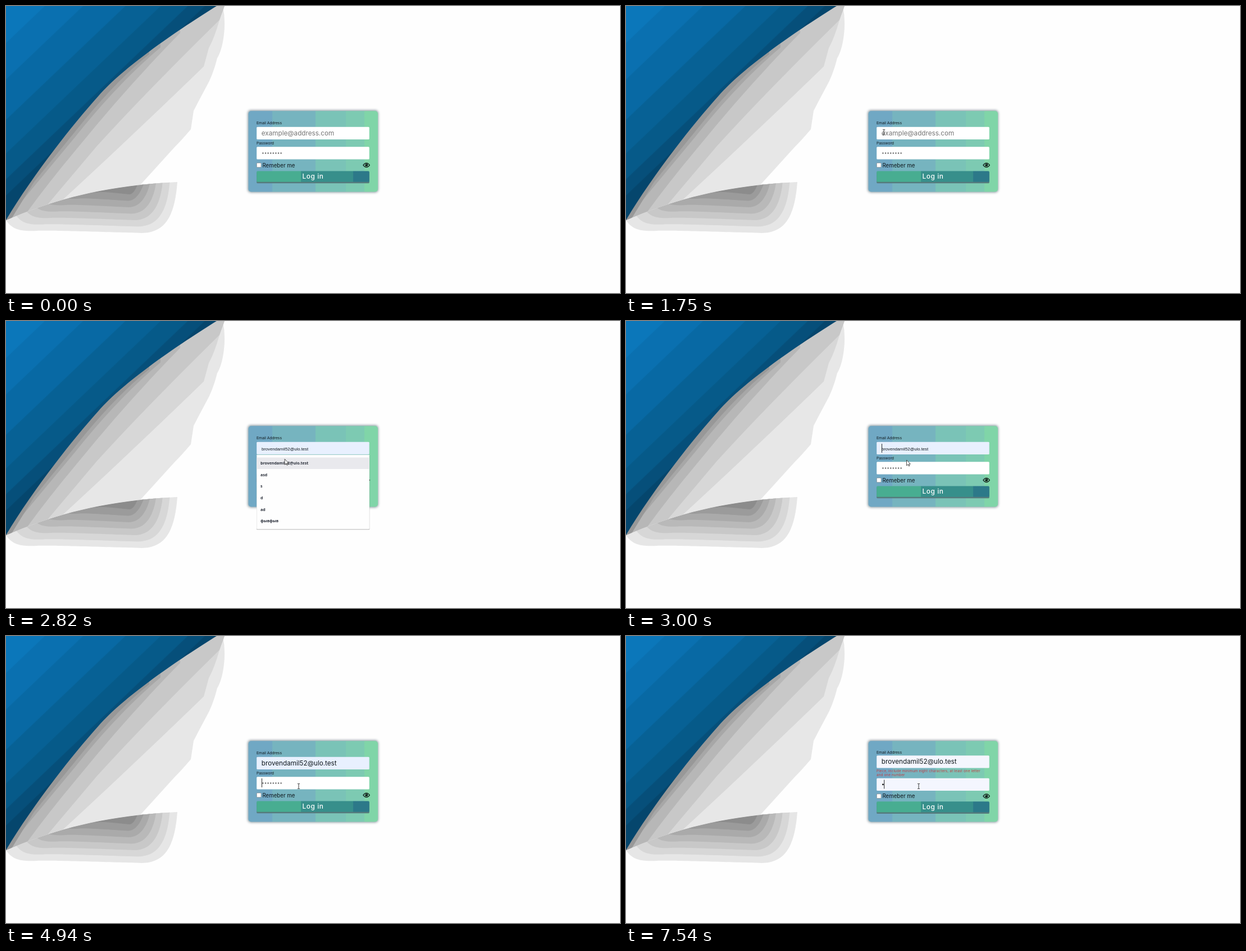
Write an HTML page that moves like this. It is 1093 px wide and 512 px high and loops after 8 s.

```html
<!DOCTYPE html>
<html lang="en">
<head>
<meta charset="utf-8">
<title>Login form</title>
<style>
  html, body { margin: 0; width: 100%; height: 100%; overflow: hidden; background: #fefefe; }
  svg { display: block; width: 100%; height: 100%; }
  text { font-family: Inter, sans-serif; fill: #10181c; white-space: pre; }
  .label { font-size: 6.7px; }
  .value { font-size: 11.7px; }
  .hint { fill: #757575; }
  .preview { font: 7.7px "Liberation Sans", Arial, sans-serif; }
  .option { font: 600 7px "Noto Sans", sans-serif; fill: #2b303b; }
  .error { font-size: 6.2px; letter-spacing: .2px; fill: #c23c40; }
  .button { font-size: 11.8px; font-weight: 500; letter-spacing: .6px; fill: #fff; }
  .caret { stroke: #111; stroke-width: .9; }
</style>
</head>
<body>
<svg viewBox="0 0 1093 512" preserveAspectRatio="none">
  <defs>
    <clipPath id="above"><path d="M0 382C90 343 180 320 305 314H400V0H0Z"/></clipPath>
    <clipPath id="below"><path d="M0 382C90 343 180 320 305 314V420H0Z"/></clipPath>
    <linearGradient id="blue" gradientUnits="userSpaceOnUse" x1="0" y1="0" x2="199.800" y2="209.200"></linearGradient>
    <linearGradient id="panel" gradientUnits="userSpaceOnUse" x1="431" y1="0" x2="662" y2="0"></linearGradient>
    <linearGradient id="action" gradientUnits="userSpaceOnUse" x1="446" y1="0" x2="647" y2="0"></linearGradient>
    <filter id="glow" x="-10%" y="-10%" width="120%" height="120%"><feGaussianBlur stdDeviation="1.9"/></filter>
  </defs>

  <g id="shadow" clip-path="url(#below)"></g>
  <g id="curl" clip-path="url(#above)"></g>
  <path fill="url(#blue)" d="M0 0H375C327 30 214 103 165 160C114 217 45 306 0 382Z"/>

  <rect x="430.500" y="186" width="232" height="146.500" rx="5" fill="#48606a" opacity=".65" filter="url(#glow)"/>
  <rect x="431.500" y="187.300" width="230.500" height="144.200" rx="5" fill="url(#panel)"/>

  <text id="emailLabel" class="label" x="446" y="211.200">Email Address</text>
  <g id="emailField">
    <rect id="emailBox" x="446.200" y="215.800" width="200.500" height="22.200" rx="1.500"/>
    <text id="emailHint" class="value hint" x="454.800" y="230.700">example@address.com</text>
    <text id="emailPreview" class="preview" x="455" y="230.600"></text>
    <text id="emailValue" class="value" x="454.800" y="230.700"></text>
    <path id="emailCaret" class="caret" d="M455.500 219V235"/>
  </g>

  <text id="passLabel" class="label" x="446" y="246.600">Password</text>
  <g id="error">
    <text class="error" x="446" y="243.400">Plece, include minimum eight characters, at least one letter</text>
    <text class="error" x="446" y="249.700">and one number</text>
  </g>
  <g id="passField">
    <rect id="passBox" x="446.200" y="251.200" width="200.500" height="22.200" rx="1.500"/>
    <g id="passHint" fill="#6c6c6c"></g>
    <circle id="passDot" cx="457.400" cy="262.400" r="1.400" fill="#111"/>
    <path id="passCaret" class="caret" d="M0 254V270"/>
  </g>

  <g id="options">
    <rect x="446.300" y="280" width="7.800" height="7.800" rx="1.200" fill="#fff" stroke="#777" stroke-width=".6"/>
    <text x="456.500" y="287.600" font-size="9.700">Remeber me</text>
    <path d="M635.800 283.800Q641.600 276.200 647.400 283.800Q641.600 291.400 635.800 283.800Z" fill="none" stroke="#0c1413" stroke-width="1.100"/>
    <circle cx="641.600" cy="283.600" r="2.500" fill="#0c1413"/>
    <circle cx="640.800" cy="282.800" r=".8" fill="#7bc9af"/>
  </g>
  <g id="submit">
    <rect x="446.200" y="296" width="200.500" height="20.200" rx="1.500" fill="#557a7c"/>
    <rect x="446.200" y="294.500" width="200.500" height="19.300" rx="1.500" fill="url(#action)"/>
    <text class="button" x="527.500" y="308.300">Log in</text>
  </g>

  <g id="dropdown">
    <rect x="446" y="239" width="201.200" height="133.200" rx="1" fill="#555" opacity=".55"/>
    <rect x="446.200" y="238.300" width="200.700" height="133.200" rx="1" fill="#fefefe"/>
    <path d="M446 238.300H647" stroke="#74b8b3" stroke-width=".7"/>
    <rect id="hover" x="446.500" y="243.500" width="200" height="20.500" fill="#e9e9ed"/>
  </g>

  <path id="arrow" d="M0 0V10L2.400 7.800L4 11L5.400 10.300L3.900 7.200H6.800Z" fill="#fff" stroke="#222" stroke-width=".8"/>
  <path id="beam" d="M-2 -4.500H-.6L0 -4L.6 -4.500H2M0 -4V4M-2 4.500H-.6L0 4L.6 4.500H2" fill="none" stroke="#222" stroke-width=".9"/>
</svg>
<script>
const EMAIL = 'brovendamil52@ulo.test';
const LOOP = 8000;
const el = id => document.getElementById(id);
const add = (parent, tag, attrs, text = '') => {
  const node = document.createElementNS('http://www.w3.org/2000/svg', tag);
  for (const name in attrs) node.setAttribute(name, attrs[name]);
  node.textContent = text;
  el(parent).append(node);
};
const show = (id, on) => { el(id).style.display = on ? '' : 'none'; };
const move = (id, x, y) => el(id).setAttribute('transform', `translate(${x} ${y})`);
const gray = level => `rgb(${level},${level},${level})`;

// Flat colour bands: each entry is a colour and the position where it ends.
function bands(id, start, end, list) {
  let from = 0;
  for (const [color, stop] of list) {
    const to = (stop - start) / (end - start);
    add(id, 'stop', { offset: from + .003, 'stop-color': color });
    add(id, 'stop', { offset: to - .003, 'stop-color': color });
    from = to;
  }
}
bands('blue', 0, 400, [['#0b77ba', 66], ['#0a70b0', 131], ['#0869a4', 203],
  ['#076195', 263], ['#065a89', 309], ['#064f7a', 338], ['#05466d', 400]]);
bands('panel', 431, 662, [['#70a8c4', 474], ['#76b4bf', 551], ['#7ac3b7', 605],
  ['#7dcab2', 638], ['#80d5a8', 662]]);
bands('action', 446, 647, [['#48ad91', 525], ['#378f8b', 618], ['#2c7989', 647]]);

[[0, 382], [19, 375], [37, 367], [55, 360], [75, 353], [105, 342], [150, 331]].forEach(([x, y], i) => {
  const right = 305 - 14 * i + .47 * i * i, bottom = 405 - 11.5 * i;
  const at = share => x + share * (right - x);
  add('shadow', 'path', {
    fill: gray(230 - 15 * i),
    d: `M${x} ${y}C${at(.04)} ${bottom - 4} ${at(.1)} ${bottom - 3} ${at(.18)} ${bottom - 4}
      S${at(.65)} ${bottom - 1} ${at(.79)} ${bottom}C${at(.93)} ${bottom} ${at(.985)} ${bottom - 30} ${right} 314V290H${x}Z`
  });
});

[
  [231, 'H386Q391 25 388 50Q385 78 376 93Q368 125 355 147Q340 175 334 187L329 220Q312 240 299 253L241 317L230 335'],
  [215, 'H389L380 25Q371 57 361 75L352 108Q220 236 105 342L90 355'],
  [200, 'H389L380 25Q245 158 160 252L75 353L65 365'],
  [183, 'H310V48Q215 145 130 250Q78 312 38 367L30 380'],
  [167, 'H275V74Q200 137 122 235L25 352'],
  [152, 'H255V86Q200 130 140 203L50 314']
].forEach(([level, edge]) =>
  add('curl', 'path', { fill: gray(level), d: `M0 0${edge}L0 395Z` }));

for (let i = 0; i < 8; i++)
  add('passHint', 'circle', { cx: 457.4 + 4.6 * i, cy: 262.5, r: 1.25 });
[EMAIL, 'asd', 's', 'd', 'ad', 'фывфыв'].forEach((text, i) =>
  add('dropdown', 'text', { class: 'option', x: 453, y: 256 + 20.65 * i }, text));
el('emailPreview').textContent = el('emailValue').textContent = EMAIL;

// Pointer path: time, x, y
const PATH = [[960, 150, 2], [1000, 236, 72], [1150, 302, 121], [1300, 364, 174], [1500, 428, 208],
  [1690, 455, 219], [1750, 459, 225], [1890, 477, 225], [2380, 477, 225], [2530, 478, 231],
  [2680, 480, 238], [2850, 499.5, 248], [3250, 499.5, 248], [3550, 521, 268]];

function pointer(t) {
  const next = PATH.findIndex(key => key[0] > t);
  if (next < 0) return PATH.at(-1).slice(1);
  const [t0, x0, y0] = PATH[Math.max(next - 1, 0)], [t1, x1, y1] = PATH[next];
  const k = Math.max(0, (t - t0) / (t1 - t0));
  return [x0 + (x1 - x0) * k, y0 + (y1 - y0) * k];
}

function draw(t) {
  const within = (a, b) => t >= a && t < b;
  const [x, y] = pointer(t);
  const inField = within(1700, 2680) || (t > 3250 && y > 252);
  show('arrow', t >= 960 && !inField);
  show('beam', inField);
  move('arrow', x, y);
  move('beam', x, y);

  const invalid = t >= 6460, hovering = t >= 2740;
  show('dropdown', within(2040, 3000));
  show('hover', hovering);
  show('emailHint', !hovering);
  show('emailPreview', within(2740, 3030));
  show('emailValue', t >= 3030);
  show('emailCaret', within(2040, 2530) || within(3000, 3030));
  el('emailBox').setAttribute('fill', invalid ? '#f4f6fe' : hovering ? '#e8f0fe' : '#fff');

  const cleared = within(7300, 7540);
  show('passHint', !invalid || cleared);
  show('passDot', invalid && !cleared);
  show('passCaret', within(3890, 4420) || within(4940, 5470) || within(5990, 6990) || t >= 7510);
  move('passCaret', invalid && !cleared ? 459.7 : 455.5, 0);
  el('passBox').setAttribute('fill', invalid ? '#f4f6fe' : '#fff');

  show('passLabel', !invalid);
  show('error', invalid);
  const shift = (id, dy) => move(id, 0, invalid ? dy : 0);
  shift('emailLabel', -1);
  shift('emailField', -2.5);
  shift('passField', 2.5);
  shift('options', 1.8);
  shift('submit', .8);
}

function tick() {
  draw(performance.now() % LOOP);
  requestAnimationFrame(tick);
}
tick();
</script>
</body>
</html>
```
